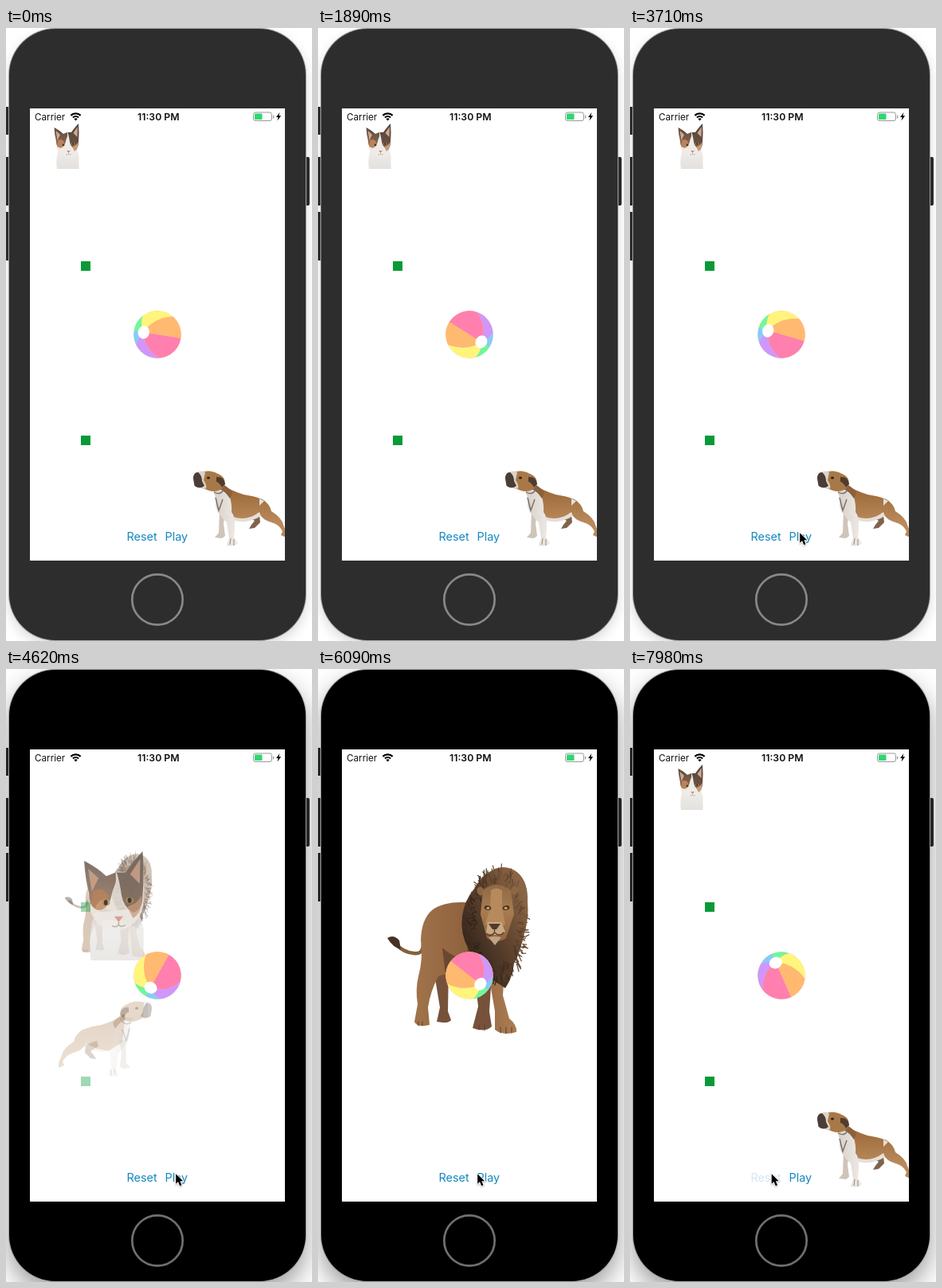
Recreate the animation shown at these times as an HTML page with a canvas. Size 384 by 770 pixels, loop 8 s.

```html
<!DOCTYPE html>
<html lang="en">
<head>
<meta charset="utf-8">
<title>Pets and ball</title>
<style>
html, body { margin: 0; width: 100%; height: 100%; overflow: hidden; background: #fff; }
canvas { display: block; }
</style>
</head>
<body>
<canvas id="stage" width="384" height="770"></canvas>
<script>
const ctx = document.getElementById('stage').getContext('2d');
const LOOP = 8000, STEP = 70, TAU = Math.PI * 2, RAD = Math.PI / 180;
const FONT = 'Inter, "Liberation Sans", sans-serif';
const MORPH_START = 4010, MORPH_TIME = 1050, RESET_AT = 7770, FOCUS_AT = 3850;

const lerp = (a, b, k) => a + (b - a) * k;
const clamp = v => Math.max(0, Math.min(1, v));
const smooth = k => k * k * (3 - 2 * k);

// Piecewise linear value over [time, value] keys.
function track(keys, t) {
  if (t <= keys[0][0]) return keys[0][1];
  for (let i = 1; i < keys.length; i++) {
    const [t0, v0] = keys[i - 1], [t1, v1] = keys[i];
    if (t <= t1) return lerp(v0, v1, (t - t0) / (t1 - t0));
  }
  return keys[keys.length - 1][1];
}

const spin = [[0, 189], [980, 853], [2730, 2043], [3710, 2716], [4620, 3359], [6090, 4358], [7980, 5646]];
const cursorX = [[2380, 382], [2660, 199.5], [2800, 199.5], [3220, 212.5], [5200, 212.5], [5480, 199.5], [6300, 199.5], [6660, 177]];
const cursorY = [[2380, 733], [2660, 682], [2800, 682], [3220, 633]];
const playAlpha = [[3780, 1], [3850, .2], [3990, .2], [4200, 1]];
const resetAlpha = [[7630, 1], [7700, .2]];

function fill(color, shape) {
  ctx.fillStyle = color;
  ctx.fill(typeof shape === 'string' ? new Path2D(shape) : shape);
}

function line(color, width, d) {
  ctx.strokeStyle = color;
  ctx.lineWidth = width;
  ctx.stroke(new Path2D(d));
}

function oval(color, x, y, rx, ry, turn = 0) {
  ctx.beginPath();
  ctx.ellipse(x, y, rx, ry, turn, 0, TAU);
  ctx.fillStyle = color;
  ctx.fill();
}

function box(color, x, y, w, h, r = 0) {
  ctx.beginPath();
  ctx.roundRect(x, y, w, h, r);
  ctx.fillStyle = color;
  ctx.fill();
}

// Evenly spaced colours from one point to another.
function blend(x0, y0, x1, y1, ...colors) {
  const g = ctx.createLinearGradient(x0, y0, x1, y1);
  colors.forEach((c, i) => g.addColorStop(i / (colors.length - 1), c));
  return g;
}

function text(str, x, y, font, color, alpha = 1) {
  ctx.globalAlpha = alpha;
  ctx.font = font + ' ' + FONT;
  ctx.fillStyle = color;
  ctx.fillText(str, x, y);
  ctx.globalAlpha = 1;
}

function phone(active) {
  const shell = active ? '#000' : '#2d2d2d';
  const key = active ? '#262626' : '#2b2b2b';
  ctx.fillStyle = '#fff';
  ctx.fillRect(0, 0, 384, 770);
  ctx.save();
  ctx.shadowColor = active ? 'rgba(0,0,0,.4)' : 'rgba(0,0,0,.16)';
  ctx.shadowBlur = active ? 32 : 16;
  ctx.shadowOffsetY = active ? 14 : 6;
  box(shell, 4, 1, 372, 768, 58);
  ctx.restore();
  for (const [x, y, h] of [[-3, 99, 35], [-3, 162, 61], [-3, 231, 61], [373, 162, 61]])
    box(key, x, y, 8, h, 2);
  box('#a4a4a4', 3, 0, 374, 770, 59);
  box(shell, 4, 1, 372, 768, 58);
  ctx.beginPath();
  ctx.arc(190, 718, 31.7, 0, TAU);
  ctx.strokeStyle = active ? '#707070' : '#888';
  ctx.lineWidth = 2.7;
  ctx.stroke();
  box('#fff', 30, 101, 320, 568);
}

function statusBar() {
  text('Carrier', 36, 115.5, '11.7px', '#111');
  text('11:30 PM', 165, 115.5, '600 12.3px', '#111');
  ctx.strokeStyle = '#000';
  ctx.lineWidth = 2.2;
  for (const r of [5, 8.7]) {
    ctx.beginPath();
    ctx.arc(87.5, 116, r, -135 * RAD, -45 * RAD);
    ctx.stroke();
  }
  fill('#000', 'M87.5 116.5 L85.3 114 Q87.5 112.3 89.7 114Z');
  ctx.beginPath();
  ctx.roundRect(310.5, 106, 23, 10.5, 2.5);
  ctx.strokeStyle = '#999';
  ctx.lineWidth = 1;
  ctx.stroke();
  box('#2fd672', 312, 107.5, 9.5, 7.5, 1);
  box('#999', 335, 109.5, 1.3, 4, 1);
  fill('#000', 'M343.5 106 L339 112 H341.6 L340.4 116.5 L345.2 110.2 H342.4Z');
}

function ball(angle) {
  const R = 29.7, capX = 18;
  const rims = [0, 43, 122, 180, 256, 324, 360].map(d => d * RAD);
  const colors = ['#70f79c', '#fff57c', '#ffb971', '#ff7fae', '#cf96fb', '#85ccf8'];
  const seam = a => {
    const x = R * Math.cos(a), y = R * Math.sin(a), b = .28 * Math.sin(a);
    return { x, y, cx: (capX + x) / 2 + b * y, cy: y / 2 - b * (x - capX) };
  };
  ctx.save();
  ctx.translate(190, 385);
  ctx.rotate(angle * RAD);
  oval('#ffc596', 0, 0, R, R);
  colors.forEach((color, i) => {
    const from = seam(rims[i]), to = seam(rims[i + 1]);
    ctx.beginPath();
    ctx.moveTo(capX, 0);
    ctx.quadraticCurveTo(from.cx, from.cy, from.x, from.y);
    ctx.arc(0, 0, R, rims[i], rims[i + 1]);
    ctx.quadraticCurveTo(to.cx, to.cy, capX, 0);
    ctx.fillStyle = color;
    ctx.fill();
  });
  oval('#fff', capX - .5, 0, 7.2, 8.3);
  ctx.restore();
}

function cat() {
  fill(blend(0, 150, 0, 177, '#f1eeeb', '#e3e1de'), 'M66 152 Q62 165 64 177 H91.5 V160 L88 150Z');
  fill('#efebe7', 'M60.5 125 Q68 129 72 133 Q78 130 82 131 Q86 125 91 120 Q92 132 91.5 144 Q92 155 83 160 Q77 163 71 160 Q63 156 63.5 147 Q61 135 60.5 125Z');
  fill(blend(0, 125, 0, 148, '#5a4a42', '#8a6750'), 'M60.5 125 Q68 129 72 133 L77 131 L77 136 Q75 141 74 146 Q69 143 66 150 Q63 148 63 142 Q61 134 60.5 125Z');
  fill(blend(0, 122, 0, 152, '#54463f', '#6e5341'), 'M77.5 131 L82 131 Q86 125 91 120 Q92 132 91 143 Q91 151 86 152 Q81 149 80 143 Q79 136 77.5 131Z');
  fill('#d4a88e', 'M62.5 129 L68 134 L64.5 141Z M84.5 132 L89.8 124 L89.5 137Z');
  fill('#bd8259', 'M65 141 Q70 138 73 143 L72 149 Q67 153 64.5 148Z');
  fill('#c69a78', 'M83 149 Q89 147 90.5 143 Q91 152 86 155Z');
  oval('#a88f52', 71.8, 146.8, 2.2, 1.7);
  oval('#a88f52', 84.2, 145.6, 2.2, 1.7);
  oval('#29231d', 71.8, 146.8, 1, 1.4);
  oval('#29231d', 84.2, 145.6, 1, 1.4);
  fill('#cf8a78', 'M76.2 154 H80.8 L78.5 157Z');
  line('#a39a93', .6, 'M78.5 157 V158.5 M75 159 Q77 160 78.5 158.5 Q80 160 82 158.5');
}

function dog() {
  fill('#80634c', 'M304 606 L318 611 L319 621 L312 628 L305 629 L308 624 L312 619 L302 613Z');
  fill('#cfc4ba', 'M268 604 L276 606 L273 622 L275 638 L271 641 L262 640 L267 634Z');
  fill(blend(0, 580, 0, 622, '#9d6a3a', '#b98a5c'), 'M268 572 Q282 581 298 586 Q312 588 322 592 Q331 598 333 607 Q346 615 348 624 L352 634 V640 L345 637 L347 632 Q342 623 333 621 Q322 618 317 609 Q304 619 288 618 L272 608Z');
  fill(blend(262, 0, 290, 0, '#d9d1ca', '#eeeae6'), 'M258 577 L270 577 Q278 581 280 586 Q284 598 283 608 Q288 614 287 626 L286 640 L291 647 Q288 652 277 650 L280 641 L277 621 Q266 612 263 600 Q264 587 258 577Z');
  fill('#e6dfd8', 'M285 614 Q302 620 318 608 L320 613 Q304 623 287 619Z M318 591 L324 594 L318 600Z');
  fill('#8c6039', 'M270 572 Q280 577 284 584 L281 591 Q275 582 268 579Z');
  fill('#a87847', 'M245 558 Q256 554 266 560 Q275 563 275 573 Q272 581 262 582 Q252 582 246 576Z');
  fill('#ddd3ca', 'M240 558 Q246 555 250 558 L248 568 Q254 577 249 580 L240 576Z');
  fill('#4b3d36', 'M235 566 Q235 558 241 558 Q246 562 246 569 L249 575 Q243 580 236.5 575Z');
  fill('#4f3c30', 'M264 564 Q274 563 275 573 L271 577 Q268 571 264 570Z');
  oval('#2a211d', 254, 565, 2, 1.6);
  line('#756e68', 1.4, 'M261 583 Q270 588 274 578 M263 590 L267 606 L272 592');
  line('#8d725d', .8, 'M282 641 L281 649 M286 642 L286 650');
}

function randomizer(seed) {
  return () => (seed = (seed * 16807) % 2147483647) / 2147483647;
}

// Tufts radiating around the mane's outline, lighter on its right side.
const tufts = (() => {
  const rnd = randomizer(41);
  return Array.from({ length: 260 }, () => {
    const a = rnd() * TAU, r = .62 + rnd() * .3, reach = r + .08 + rnd() * .08, bend = rnd() * .16 - .08;
    const at = (k, turn) => `${225 + 39 * k * Math.cos(a + turn)} ${321 + 74 * k * Math.sin(a + turn)}`;
    const path = new Path2D(`M${at(r, 0)} Q${at((r + reach) / 2, bend / 3)} ${at(reach, bend)}`);
    const light = 24 + 9 * Math.cos(a + .6) + 12 * (rnd() - .5);
    return { path, color: `hsl(27 35% ${light}%)` };
  });
})();

function lion() {
  ctx.lineCap = 'round';
  line('#85603f', 4.5, 'M132 345 Q132 359 120 357 Q107 356 97 345');
  fill('#473124', 'M104 352 Q94 350 87 338 Q95 333 102 341Z');
  fill('#76523a', 'M143 375 L164 373 L163 430 L167 441 Q164 446 149 443 L153 425 L148 395Z M196 380 L218 384 L215 430 L218 449 Q210 457 194 451 L201 424Z');
  fill(blend(125, 0, 245, 0, '#a0724a', '#8f623e', '#a97b52'), 'M196 294 Q160 290 143 303 Q130 314 129 340 Q132 365 126 386 Q122 402 125 421 L121 443 Q124 451 140 447 L138 425 Q141 405 151 386 Q170 379 201 389 L216 395 L222 430 L222 453 Q231 461 249 456 Q250 447 240 439 L232 410 L235 365 Q235 315 196 294Z');
  fill('#6a4830', 'M156 350 Q176 369 207 365 L206 389 Q178 377 160 383Z');
  fill(blend(182, 330, 262, 290, '#3a291e', '#5f432e', '#8a6545'), 'M222 251 Q238 245 251 256 Q264 268 263 292 Q265 312 259 332 Q255 352 246 370 Q244 388 235 401 Q222 392 212 386 Q196 374 189 352 Q178 332 181 310 Q184 290 196 276 Q206 258 222 251Z');
  ctx.lineWidth = 1.2;
  for (const { path, color } of tufts) {
    ctx.strokeStyle = color;
    ctx.stroke(path);
  }
  oval('#8d6643', 204, 279, 4.5, 5.5, -.4);
  oval('#8d6643', 247, 278, 4.5, 5.5, .4);
  fill(blend(0, 268, 0, 340, '#8d6744', '#a97b50', '#8f6543'), 'M207 278 Q223 264 242 278 L246 308 L236 338 Q225 346 212 338 L204 308Z');
  fill('#b78a5d', 'M217 278 Q224 273 231 278 L231 300 L235 320 L223 330 L210 320 L216 300Z');
  fill('#c9a985', 'M213 318 L230 318 L235 330 Q226 338 211 331Z');
  oval('#4a3323', 213, 300, 4.4, 2.8, .25);
  oval('#4a3323', 236, 300, 4.4, 2.8, -.25);
  oval('#c9a766', 213.3, 300.3, 2, 1.6);
  oval('#c9a766', 235.7, 300.3, 2, 1.6);
  fill('#54382b', 'M214 320 H229 L224 327 H219Z');
  line('#5d3b29', 1.3, 'M221.5 327 V331 M211 333 Q217 337 221.5 331 Q228 337 233 331');
  fill('#bfa384', 'M214 337 Q222 335 230 337 L222 347Z');
  line('#5f412c', 1, 'M126 443 V448 M131 443 V448 M229 450 V457 M236 450 V458 M243 450 V457 M202 447 V453 M209 447 V454');
}

// Draws art whose own middle is (mx, my) around a new middle.
function place(art, mx, my, x, y, sx, sy, alpha) {
  if (alpha <= 0) return;
  ctx.save();
  ctx.globalAlpha = alpha;
  ctx.translate(x, y);
  ctx.scale(sx, sy);
  ctx.translate(-mx, -my);
  art();
  ctx.restore();
}

function cursor(x, y) {
  const arrow = new Path2D('M0 0 V14.5 L3.4 11.4 L6 17.4 L8.8 16.2 L6.2 10.5 H10.8Z');
  ctx.save();
  ctx.translate(x + .7, y + 1.2);
  ctx.scale(.83, .86);
  ctx.shadowColor = 'rgba(0,0,0,.3)';
  ctx.shadowBlur = 2;
  ctx.shadowOffsetY = 1;
  ctx.strokeStyle = '#fff';
  ctx.lineWidth = 2;
  ctx.stroke(arrow);
  ctx.shadowColor = 'transparent';
  fill('#000', arrow);
  ctx.restore();
}

function draw(t) {
  const p = t >= RESET_AT ? 0 : smooth(clamp((t - MORPH_START) / MORPH_TIME));
  phone(t >= FOCUS_AT);
  ctx.save();
  ctx.beginPath();
  ctx.rect(30, 101, 320, 568);
  ctx.clip();
  statusBar();
  text('Reset', 151.5, 644, '14.4px', '#1588be', track(resetAlpha, t));
  text('Play', 199.5, 644, '14.4px', '#1588be', track(playAlpha, t));
  place(lion, 177, 352, lerp(52, 177, p), lerp(205, 352, p), p, p, p * p);
  const grow = lerp(1, 3.26, p);
  place(cat, 77, 148, lerp(77, 175, p), lerp(148, 387, p), grow, grow, 1 - p ** 3);
  place(dog, 294, 604, lerp(294, 20, p), lerp(604, 380, p), p > 0 ? -1 : 1, 1, (1 - p) ** 1.3);
  ctx.globalAlpha = 1 - p;
  box('#079a38', 94, 293, 12, 12);
  box('#079a38', 94, 512, 12, 12);
  ctx.globalAlpha = 1;
  ball(track(spin, t));
  ctx.restore();
  if (t >= 2380) cursor(track(cursorX, t), track(cursorY, t));
}

function tick() {
  const t = performance.now() % LOOP;
  draw(Math.floor(t / STEP) * STEP);
  requestAnimationFrame(tick);
}
tick();
</script>
</body>
</html>
```
